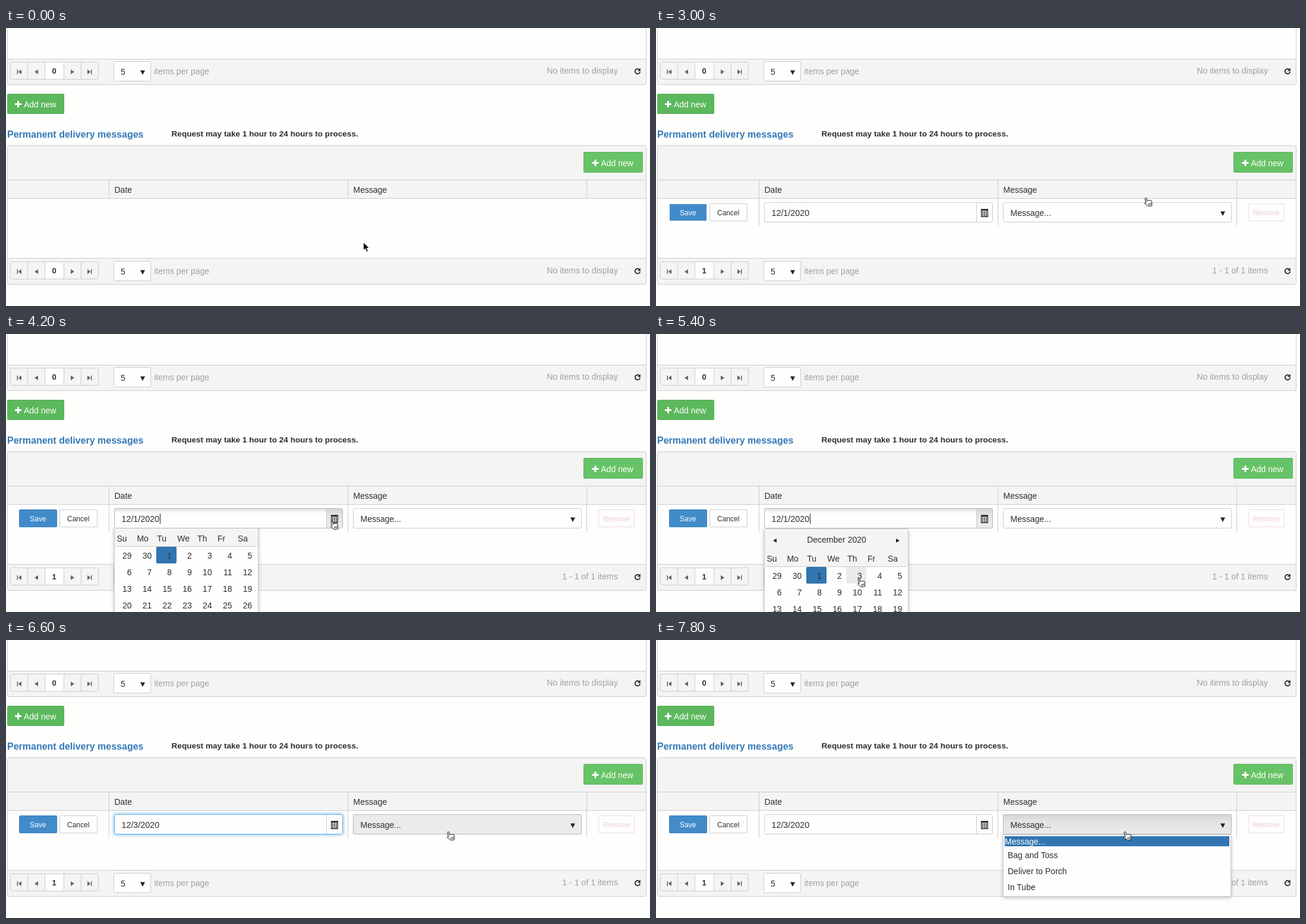
Recreate the animation shown at these times as an HTML page. Size 1084x469 px, loop 8 s.

```html
<!DOCTYPE html>
<html lang="en">
<head>
<meta charset="utf-8">
<title>Delivery messages</title>
<style>
  html, body { margin: 0; width: 100%; height: 100%; overflow: hidden; background: #fefefd; }
  svg { display: block; width: 1084px; height: 469px; }
  text { font: 14px "Liberation Sans", Arial, sans-serif; fill: #2e2e2e; white-space: pre; }
  .bold { font-weight: bold; }
  .note { font-size: 13.6px; }
  .title { font-size: 16px; fill: #337ab7; }
  .small { font-size: 12px; }
  .mid { text-anchor: middle; }
  .end { text-anchor: end; }
  .muted { fill: #a0a0a0; }
  .count { font-size: 14.2px; }
  .date { font-size: 14.3px; }
  .white { fill: #fff; }
  .num { font-size: 13px; }
  .panel { fill: #f4f4f4; }
  .line { fill: none; stroke: #ccc; }
  .box { fill: #fefefe; stroke: #ccc; }
  .nav { fill: #666; }
  .ink { fill: #222; }
  .shadow { filter: drop-shadow(0 2px 3px rgba(0, 0, 0, .25)); }

  .cursor, .step { animation: 8s step-end infinite; }
  .empty { animation-name: empty; }
  .row { animation-name: row; }
  .arrow { animation-name: arrow; }
  .hand { animation-name: hand; }
  .hot { animation-name: hot; }
  .edge { animation-name: edge; }
  .open { animation-name: open; }
  .slide { animation-name: slide; }
  .pick { animation-name: pick; }
  .before { animation-name: before; }
  .after { animation-name: after; }
  .glow { animation-name: glow; }
  .over { animation-name: over; }
  .drop { animation-name: drop; }
  .unroll { animation-name: unroll; }
  .cursor { animation-name: move; }

  @keyframes empty { 0% { opacity: 1 } 25%, 100% { opacity: 0 } }
  @keyframes row { 0% { opacity: 0 } 25%, 100% { opacity: 1 } }
  @keyframes arrow { 0% { opacity: 1 } 12.5%, 100% { opacity: 0 } }
  @keyframes hand { 0% { opacity: 0 } 12.5%, 100% { opacity: 1 } }
  @keyframes hot { 0% { opacity: 0 } 12.5% { opacity: 1 } 27.5%, 100% { opacity: 0 } }
  @keyframes edge { 0% { opacity: 0 } 40%, 100% { opacity: 1 } }
  @keyframes open { 0% { opacity: 0 } 52.5% { opacity: 1 } 72.5%, 100% { opacity: 0 } }
  @keyframes slide { 0% { transform: translateY(-34px) } 55%, 100% { transform: none } }
  @keyframes pick { 0% { opacity: 0 } 65%, 100% { opacity: 1 } }
  @keyframes before { 0% { opacity: 1 } 72.5%, 100% { opacity: 0 } }
  @keyframes after { 0% { opacity: 0 } 72.5%, 100% { opacity: 1 } }
  @keyframes glow { 0% { opacity: 0 } 72.5% { opacity: 1 } 92.5%, 100% { opacity: 0 } }
  @keyframes over { 0% { opacity: 0 } 80% { opacity: 1 } 92.5%, 100% { opacity: 0 } }
  @keyframes drop { 0% { opacity: 0 } 92.5%, 100% { opacity: 1 } }
  @keyframes unroll { 0% { transform: translateY(-40px) } 95%, 100% { transform: none } }
  @keyframes move {
    0% { transform: translate(601px, 361px); animation-timing-function: steps(2) }
    5% { transform: translate(700px, 330px); animation-timing-function: steps(3) }
    12.5% { transform: translate(985px, 242px) }
    15% { transform: translate(995px, 233px) }
    17.5% { transform: translate(996px, 232px) }
    25% { transform: translate(996px, 232px); animation-timing-function: steps(5) }
    37.5% { transform: translate(821px, 285px); animation-timing-function: steps(5) }
    50%, 52.5% { transform: translate(545px, 314px) }
    52.5% { animation-timing-function: steps(6) }
    67.5%, 70% { transform: translate(338px, 411px) }
    70% { animation-timing-function: steps(5) }
    82.5% { transform: translate(741px, 322px); animation-timing-function: steps(3) }
    90%, 100% { transform: translate(786px, 322px) }
  }
</style>
</head>
<body>
<svg viewBox="0 0 1084 469">
  <defs>
    <g id="pager">
      <rect class="line" x="7.5" y="57.5" width="148" height="29" rx="2"/>
      <path class="line" d="M36.5 57v30M126.500 57v30"/>
      <rect class="box" x="65.500" y="57.500" width="32" height="29"/>
      <path class="nav" d="M18.500 70h1.500v8h-1.500zM26 70v8l-5.500-4zM54 70v8l-6-4zM109 70v8l6-4zM137 70v8l5.500-4zM143 70h1.500v8h-1.500z"/>
      <rect class="box" x="181.500" y="56.500" width="62" height="33" rx="2"/>
      <text x="193" y="79">5</text>
      <path class="ink" d="M226 71.500h8l-4 7.500z"/>
      <text class="muted" x="249.500" y="78">items per page</text>
      <path d="M1065.500 69.800A4.200 4.200 0 1 0 1067.200 73.500" fill="none" stroke="#222" stroke-width="1.800"/>
      <path class="ink" d="M1067.800 67.500v5h-5z"/>
    </g>
    <path id="plus" d="M0 5.500h11M5.500 0v11" stroke="#fff" stroke-width="3"/>
    <linearGradient id="pressed" x2="0" y2="1">
      <stop stop-color="#d4d4d4"/>
      <stop offset=".3" stop-color="#e2e2e2"/>
      <stop offset="1" stop-color="#ebebeb"/>
    </linearGradient>
    <linearGradient id="inset" x2="0" y2="1">
      <stop stop-color="#e2e2e2"/>
      <stop offset=".25" stop-color="#fefefe"/>
    </linearGradient>
    <clipPath id="below"><rect x="170" y="328" width="830" height="141"/></clipPath>
  </defs>

  <rect width="1084" height="469" fill="#fefefd"/>

  <!-- upper grid -->
  <path class="panel" d="M3 53h1074v42H3z"/>
  <path class="line" d="M2.500-5V93q0 2.500 2.500 2.500H1075q2.500 0 2.500-2.500V-5M3 52.500H1077"/>
  <use href="#pager"/>
  <text class="bold num mid" x="81" y="77">0</text>
  <text class="muted count end" x="1030" y="77">No items to display</text>

  <rect x="2.500" y="111.500" width="95" height="33" rx="1.500" fill="#5cb85c" stroke="#4fae4f"/>
  <use href="#plus" x="15" y="123"/>
  <text class="white" x="30" y="134">Add new</text>
  <text class="bold title" x="2" y="185">Permanent delivery messages</text>
  <text class="bold note" x="278.500" y="183">Request may take 1 hour to 24 hours to process.</text>

  <!-- lower grid -->
  <path class="panel" d="M3 199h1074v89H3zM3 389h1074v43H3z"/>
  <rect class="line" x="2.500" y="198.500" width="1075" height="234" rx="2.500"/>
  <path class="line" d="M3 256.500H1077M3 287.500H1077M3 388.500H1077M173.500 257v31M575.500 257v31M977.500 257v31"/>
  <rect x="972.500" y="209.500" width="99" height="34" rx="1.500" fill="#67c367" stroke="#58b558"/>
  <rect class="step hot" x="972" y="209" width="100" height="35" rx="2" fill="#70ca70"/>
  <use href="#plus" x="986.500" y="222"/>
  <text class="white" x="1001.500" y="233">Add new</text>
  <text x="182.500" y="278">Date</text>
  <text x="584.500" y="278">Message</text>
  <use href="#pager" y="337"/>
  <g class="step empty">
    <text class="bold num mid" x="81" y="414">0</text>
    <text class="muted count end" x="1030" y="414">No items to display</text>
  </g>

  <!-- edited row -->
  <g class="step row">
    <text class="bold num mid" x="81" y="414">1</text>
    <text class="muted count end" x="1030" y="414">1 - 1 of 1 items</text>
    <path class="line" d="M173.500 288v46M575.500 288v46M977.500 288v46"/>
    <path d="M23 297h62v28H23z" fill="#428bca"/>
    <rect class="step edge" x="22.500" y="296.500" width="63" height="29" rx="1.500" fill="#428bca" stroke="#357ebd"/>
    <text class="small white" x="40" y="316">Save</text>
    <rect class="box" x="90.500" y="296.500" width="63" height="29" rx="1.500"/>
    <text class="small" x="103" y="316">Cancel</text>
    <rect x="997.500" y="296.500" width="60" height="29" rx="1.500" fill="#fefefe" stroke="#eedada"/>
    <text class="small" x="1005" y="316" style="fill:#f0cccc">Remove</text>

    <rect class="box" x="182.500" y="294.500" width="384" height="33" rx="2"/>
    <g class="step glow">
      <rect x="182.500" y="294.500" width="384" height="33" rx="2" fill="#fefefe" stroke="#66afe9"
        style="filter:drop-shadow(0 0 3px #66afe9)"/>
    </g>
    <g class="step open">
      <rect x="182.500" y="294.500" width="384" height="33" rx="2" fill="url(#inset)" stroke="#b5b5b5"/>
      <path d="M540 295h26v32h-26z" fill="url(#pressed)"/>
      <path d="M259.500 303v17" stroke="#222"/>
    </g>
    <path class="line" d="M539.500 295v32"/>
    <rect x="547.600" y="306" width="10.800" height="12.400" fill="#fefefe" stroke="#222" stroke-width="1.200"/>
    <path d="M547 307h12" stroke="#222" stroke-width="2.500"/>
    <path d="M549 310.500h8.500M549 313.500h8.500M549 316.500h8.500" stroke="#222" stroke-width="2" stroke-dasharray="2 1"/>
    <text class="date step before" x="194.500" y="317">12/1/2020</text>
    <text class="date step after" x="194.500" y="317">12/3/2020</text>

    <rect class="box" x="584.500" y="294.500" width="384" height="33" rx="2"/>
    <rect class="step over" x="584.500" y="294.500" width="384" height="33" rx="2" fill="#ebebeb" stroke="#b5b5b5"/>
    <rect class="step drop" x="584.500" y="294.500" width="384" height="33" rx="2" fill="url(#pressed)" stroke="#b5b5b5"/>
    <text x="596.500" y="317">Message...</text>
    <path class="ink" d="M950 309.500h8l-4 7.500z"/>
  </g>

  <!-- calendar -->
  <g clip-path="url(#below)">
    <g class="step open">
      <g class="step slide" id="calendar">
        <rect class="box shadow" x="182.500" y="328.500" width="242" height="250" rx="2"/>
        <path class="panel" d="M183 329h241v63H183z"/>
        <path class="line" d="M184 392.500h238"/>
        <text class="mid" x="304" y="352">December 2020</text>
        <path class="ink" d="M203 345v7l-6-3.500zM404 345v7l6-3.500z"/>
        <rect x="253.500" y="393.500" width="33" height="27" rx="1" fill="#3276b1" stroke="#2d6ca2"/>
        <path class="step pick" d="M320 393h34v28h-34z" fill="#ebebeb"/>
      </g>
    </g>
  </g>

  <!-- message list -->
  <g clip-path="url(#below)">
    <g class="step drop">
      <g class="step unroll">
        <rect class="box shadow" x="584.500" y="328.500" width="383" height="104"/>
        <path d="M587 331h378v17H587z" fill="#3276b1"/>
        <text class="white" x="587" y="345">Message...</text>
        <text x="592" y="368">Bag and Toss</text>
        <text x="592" y="395">Deliver to Porch</text>
        <text x="592" y="422">In Tube</text>
      </g>
    </g>
  </g>

  <g class="cursor">
    <path class="step arrow" d="M.500.500V14l3.200-2.800 2.300 5.300 2.500-1.100-2.300-5.100H10.500z" fill="#000" stroke="#fff"/>
    <g class="step hand">
      <g transform="rotate(-14 7 9)" stroke="#000" stroke-linejoin="round">
        <path fill="#fff" d="M3.700 9.500V2.300a1.300 1.300 0 0 1 2.600 0V6.600c.3-1 2.200-.9 2.500.2.500-.8 2.100-.6 2.400.5.600-.6 2.200-.4 2.200 1.100 0 2.400-.3 3.400-1 4.800V16H6.200L5 14 1.500 10.500c-1-1.200.6-2.400 1.600-1.600z"/>
        <path fill="none" stroke-width=".8" d="M7.200 11v3M9 11v3M10.800 11v3"/>
      </g>
    </g>
  </g>
</svg>
<script>
  const calendar = document.getElementById('calendar');

  function label(text, x, y, cls) {
    const el = document.createElementNS('http://www.w3.org/2000/svg', 'text');
    el.setAttribute('x', x);
    el.setAttribute('y', y);
    el.setAttribute('class', cls);
    el.textContent = text;
    calendar.append(el);
  }

  ['Su', 'Mo', 'Tu', 'We', 'Th', 'Fr', 'Sa'].forEach((d, i) => label(d, 186.5 + i * 33.9, 384, ''));

  const first = new Date(2020, 10, 29);
  for (let i = 0; i < 35; i++) {
    const day = new Date(first.getFullYear(), first.getMonth(), first.getDate() + i).getDate();
    label(day, 211.5 + (i % 7) * 33.8, 413 + Math.floor(i / 7) * 28, 'end');
  }
</script>
</body>
</html>
```
